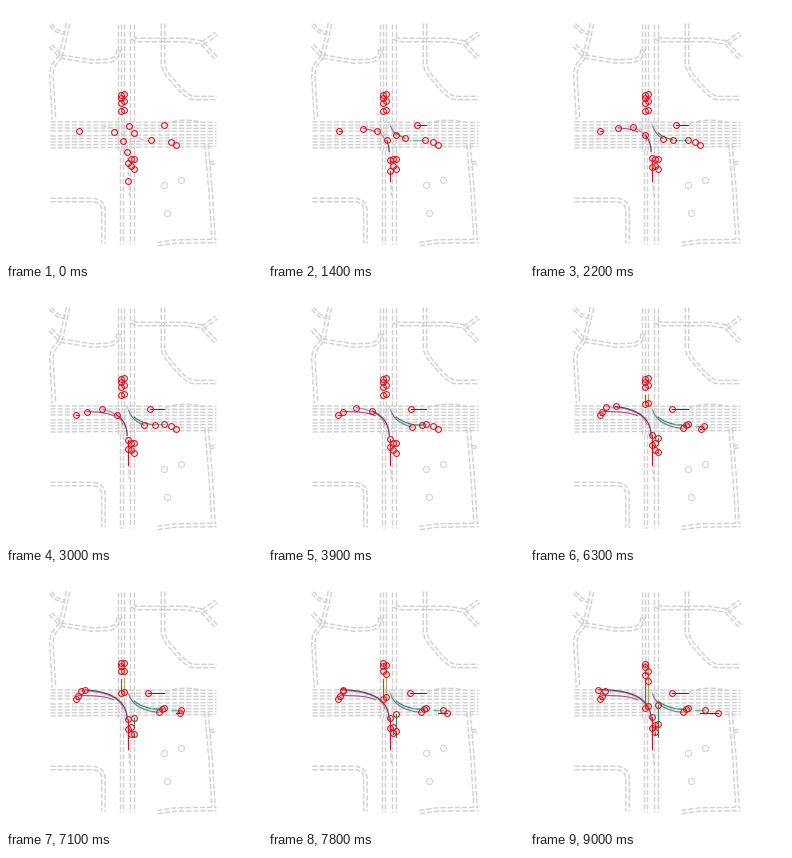
A matplotlib script for the animation above (9.1 s loop, 256x256 px).

```python
import numpy as np
import matplotlib.pyplot as plt
from matplotlib.animation import FuncAnimation

SIZE, DPI = 256, 64
FRAMES, STEP = 91, 100
PX = 72 / DPI
GREY, RED = "#d0d0d0", "#e30f1c"
GREEN, TAN, TEAL, PLUM = "#1f8a55", "#b8a060", "#60b8a0", "#582850"
T = np.arange(FRAMES) * STEP / 1000

fig = plt.figure(figsize=(SIZE / DPI, SIZE / DPI), dpi=DPI, facecolor="white")
ax = fig.add_axes([0, 0, 1, 1])
ax.set(xlim=(0.5, SIZE + 0.5), ylim=(SIZE + 0.5, 0.5))
ax.axis("off")


def bend(a, corner, b, n=12):
    """Quadratic curve from a to b, pulled towards corner."""
    s = np.linspace(0, 1, n)[:, None]
    a, c, b = map(np.array, (a, corner, b))
    return ((1 - s) ** 2 * a + 2 * s * (1 - s) * c + s * s * b).tolist()


# --- street map ---

def lane(pts, offset=0.0):
    p = np.array(pts, float)
    if offset:
        tan = np.gradient(p, axis=0)
        tan /= np.linalg.norm(tan, axis=1)[:, None]
        p += offset * np.c_[-tan[:, 1], tan[:, 0]]
    ax.plot(*p.T, color=GREY, lw=1.4 * PX, ls=(0, (3.7, 1.4)),
            dash_capstyle="butt", zorder=1)


def road(*pts, gap=3.4):
    for side in (-0.5, 0.5):
        lane(pts, side * gap)


def draw_map():
    # north-west streets
    road((62.5, 18), (59, 34), (55, 51))
    road((45, 19), (52, 26), (60, 28), gap=2.6)
    road((45, 40), (55, 51))
    road((55, 51), (86, 56), *bend((102, 55.5), (113, 54), (113, 44)))
    road((55, 51), *bend((50, 57), (45.5, 62), (46, 72)), (48.5, 114))
    # north-east streets
    road(*bend((127, 32), (129, 34.5), (133, 34.5)), (180, 34.5), (197, 37))
    road((157.5, 18), *bend((157.5, 58), (158, 66), (167, 75)),
         *bend((171, 80), (182, 92), (188, 92.5)), (211, 92.5))
    for y in (28, 53):
        road((197, 38), (211, y))
    # avenue
    for x in (112.3, 115.6, 118.6, 124.6, 128.2):
        lane([(x, 18), (x, 144)])
    for x in (114.4, 117.6, 124.8, 128.3):
        lane([(x, 144), (x, 238)])
    lane([(121.5, 144), (124, 190)])
    # cross street
    for y in np.arange(116.4, 127, 3):
        lane([(45, y), (211, y + 0.5)])
    for y in np.arange(130, 143, 3):
        lane([(45, y + 0.5), (211, y - 1)])
    lane(bend((160, 118), (178, 112), (198, 117)))
    # turn lanes
    lane(bend((122, 145), (122, 122), (98, 121)))
    lane(bend((122, 116), (124, 136), (150, 136)))
    # south-east and south-west streets
    road((201, 139), (205, 185), (208, 233))
    road((204, 158), (211, 156.5), gap=2.6)
    road((152, 238.5), (170, 236), (211, 235.5))
    road((45, 194.5), *bend((86, 194.5), (98, 194.5), (98, 206)), (98, 238))
    # parked
    ax.plot([175, 158, 161], [174.3, 179, 207.3], "o", ms=6 * PX,
            mfc="none", mec=GREY, mew=PX, snap=False, zorder=1)


# --- cars: each rule gives the distance driven by time T ---

def launch(start, accel=2, top=7.5):
    """Wait, speed up evenly, then hold top speed."""
    dt = np.maximum(T - start, 0)
    ramp = np.minimum(dt, top / accel)
    return accel * ramp ** 2 / 2 + top * (dt - ramp)


def glide(reach, speed, sharp):
    """Roll at speed, then settle at reach; sharp sets how late it brakes."""
    x = speed * T / reach
    return reach * x / (1 + x ** sharp) ** (1 / sharp)


def straight(color, pos, heading, dist):
    cars.append((color, np.outer(dist, heading) + pos))


def turn(color, a, corner, b, speed, sharp=10):
    p = np.array(bend(a, corner, b, 80))
    arc = np.r_[0, np.cumsum(np.hypot(*np.diff(p, axis=0).T))]
    d = glide(arc[-1], speed, sharp)
    cars.append((color, np.c_[np.interp(d, arc, p[:, 0]),
                              np.interp(d, arc, p[:, 1])]))


def queue(color, x, way, *cars_waiting):
    for y, start in cars_waiting:
        straight(color, (x, y), (0, way), launch(start))


cars = []
queue(GREEN, 115.2, 1, (89, 7.6), (92, 7.9), (97, 7), (105.5, 3.3))
queue(TAN, 118.2, 1, (88, 6), (95, 5.4), (104, 3.3))
queue(GREEN, 125, -1, (153.3, 7.6), (160, 7.6))
queue(GREEN, 128.2, -1, (153.7, 4.1), (163, 5.5))

# turning west
turn("#b04888", (108, 126.3), (98, 121.5), (72.3, 122.2), 9)
turn("#d0789c", (117.3, 135), (112, 118), (75.3, 117.2), 9)
turn("#603858", (121.6, 146), (121, 114), (64, 116.4), 8.1)

# turning east
turn("#6878a0", (123.2, 120.8), (129, 137), (153.5, 138.8), 7.4)
turn(GREEN, (128.6, 127.5), (138, 135.5), (156.8, 136), 7.5)

# rolling up to a stop
straight("#903060", (73, 125.2), (-1, 0), glide(2.3, 1.6, 4))
straight("#b02040", (122, 157), (0, -1), glide(20, 2.1, 2))
straight("#c01830", (122.4, 175.7), (0, -1), glide(22, 8.5, 2))
straight(TEAL, (145, 134.2), (1, 0), glide(14, 9.5, 10))
straight(PLUM, (158, 119.3), (-1, 0), glide(15.3, 5.9, 4))

# eastbound through traffic
straight(TEAL, (165.5, 136.3), (1, 0), np.minimum(launch(3.3), 9.5))
straight(PLUM, (170.7, 139.5), (1, 0), launch(5.85, accel=5))

draw_map()
trails = [ax.plot([], [], color=c, lw=1.1 * PX, zorder=2)[0] for c, _ in cars]
dots, = ax.plot([], [], "o", ms=5.8 * PX, mfc="none", mec=RED, mew=1.1 * PX,
                snap=False, zorder=3)


def update(i):
    for line, (_, path) in zip(trails, cars):
        line.set_data(*path[:i + 1].T)
    dots.set_data(*np.array([path[i] for _, path in cars]).T)
    return [*trails, dots]


anim = FuncAnimation(fig, update, frames=FRAMES, interval=STEP,
                     repeat=True, repeat_delay=0, blit=False)
plt.show()
```
